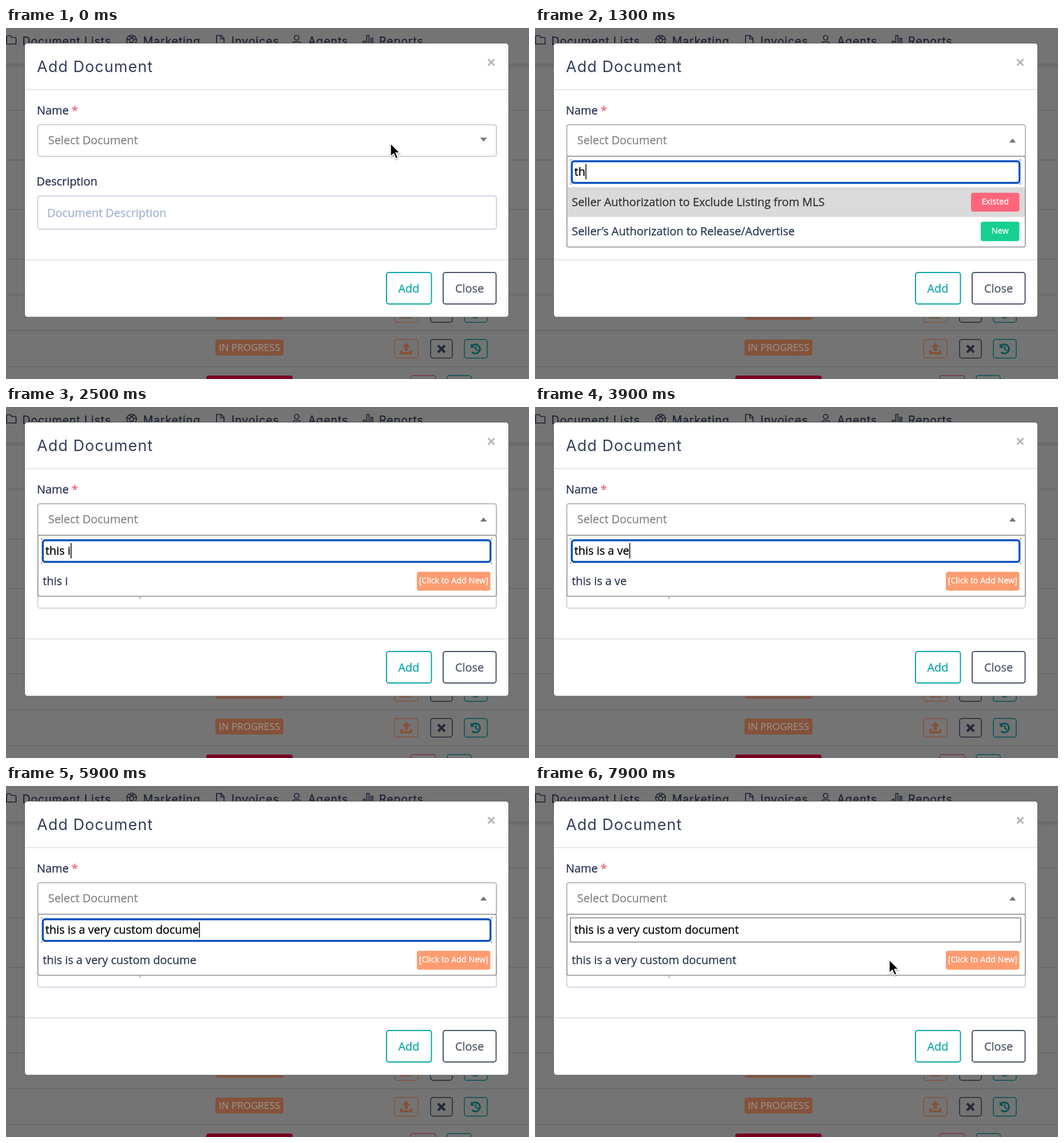
Write an HTML page that moves like this. It is 914 px wide and 613 px high and loops after 8000 ms.

```html
<!DOCTYPE html>
<html lang="en">
<head>
<meta charset="utf-8">
<title>Add Document</title>
<style>
  html, body { margin: 0; width: 100%; height: 100%; overflow: hidden; background: #747474; }
  svg { display: block; }
  text { font: 19.88px "Open Sans", "Noto Sans", sans-serif; color: #2c3654; fill: currentColor; stroke: currentColor; stroke-width: .3px; white-space: pre; }
  .nav text { font: 19.5px Inter, sans-serif; letter-spacing: .9px; color: #1d2234; }
  .nav path, .nav circle { fill: none; stroke: #1d2234; stroke-width: 1.7; }
  text.title { font: 27px Inter, sans-serif; letter-spacing: 1.05px; color: #343e59; stroke: none; }
  text.tag { font-size: 14.3px; color: #fff; text-anchor: middle; }
  text.status { font-size: 17px; color: #958d88; text-anchor: middle; }
  text.mid { text-anchor: middle; }
</style>
</head>
<body>
<svg id="stage" width="914" height="613" viewBox="0 0 914 613"></svg>
<script>
const box = (x, y, w, h, fill, stroke = 'none', sw = 1.5, r = 4) =>
  `<rect x="${x}" y="${y}" width="${w}" height="${h}" rx="${r}" fill="${fill}" stroke="${stroke}" stroke-width="${sw}"/>`;
const label = (x, y, s, cls = '', color = '') =>
  `<text x="${x}" y="${y}" class="${cls}"${color && ` style="color:${color}"`}>${s}</text>`;
const line = (d, stroke, sw = 1.5, fill = 'none') =>
  `<path d="${d}" fill="${fill}" stroke="${stroke}" stroke-width="${sw}"/>`;

const ORANGE = '#84523a', TEAL = '#045253', DARK = '#242734';

function actions(y) {
  return box(366, y, 119, 28, ORANGE) + label(425.5, y + 20, 'IN PROGRESS', 'status') +
    box(679, y, 41, 32.5, 'none', ORANGE) +
    line(`M699.5 ${y + 5.5}l7.500 8h-4.500v6.500h-6v-6.500h-4.500z`, 'none', 0, ORANGE) +
    line(`M691 ${y + 18.5}v5.500h17v-5.500`, ORANGE, 4) +
    box(742, y, 38, 32.5, 'none', DARK) +
    line(`M755 ${y + 10.5}l12 12m0-12l-12 12`, DARK, 4) +
    box(801, y, 40, 32.5, 'none', TEAL) +
    line(`M814.500 ${y + 11}a8 8 0 1 1 0 11`, TEAL, 3) +
    line(`M812 ${y + 7}v7.500h7.500z`, 'none', 0, TEAL) +
    line(`M821 ${y + 11.5}v5.500l4 2.500`, TEAL, 2.2);
}

const page = box(0, 0, 914, 613, '#747474', 'none', 0, 0) +
  '<rect y="62" width="914" height="9" fill="url(#shade)"/>' +
  [143.5, 230.5, 317, 403.500, 466, 528.5, 591.5].map(y => line(`M0 ${y}H914`, '#666', 1.4)).join('') +
  '<g class="nav">' +
  label(28.5, 30, 'Document Lists') + label(239.5, 30, 'Marketing') + label(394, 30, 'Invoices') +
  label(528, 30, 'Agents') + label(652, 30, 'Reports') +
  '<path d="M1 28V15q0-1.500 1.500-1.500h5l2.500 3h6q1.500 0 1.500 1.500v10z"/>' +
  '<circle cx="219.500" cy="21" r="8.500"/><path d="M219.500 17l4 3-1.500 5h-5l-1.500-5zM219.500 17l-4-3M219.500 17l4-3M223.500 20l5-1M215.500 20l-5-1"/>' +
  '<path d="M368 13h8l5 5v12h-13zM375.500 13v6h5.500"/>' +
  '<circle cx="508" cy="17" r="4"/><path d="M501 30v-2q0-4 4-4h6q4 0 4 4v2"/>' +
  '<path d="M624.500 29v-6h3v6M630.500 29V13h4v16M638 29V18h3v11"/></g>' +
  actions(481.5) + actions(544) +
  box(350, 607, 151, 20, '#780420') +
  box(707, 607, 44, 30, 'none', '#78343e') + box(771, 607, 42, 30, 'none', TEAL);

const modal = box(32.5, 26.5, 846, 478.5, '#fff', '#5c5c5c', 1, 5) +
  label(54, 77, 'Add Document', 'title') +
  line('M842.500 54.500l11 11m0-11l-11 11', '#b4b4b4', 3) +
  line('M34 107.500H877.500M34 405H877.500', '#dcdee2') +
  label(54, 151, 'Name <tspan style="color:#f3596b">*</tspan>', '', '#26304e') +
  box(55.5, 169, 801.5, 55, '#fff', '#c4c5c8', 1.7) +
  label(73.8, 203, 'Select Document', '', '#848484') +
  label(53.5, 275, 'Description', '', '#26304e') +
  box(55.5, 293.3, 801.5, 58, '#fff', '#c6cddb', 1.7) +
  label(72, 330, 'Document Description', '', '#a3b2d0') +
  box(665, 427, 78.5, 55, '#fff', '#0aa5a8', 2) + label(704, 462, 'Add', 'mid', '#0aa5a8') +
  box(764, 427, 92.5, 55, '#fff', '#4b5468', 2) + label(810, 462, 'Close', 'mid', '#4b5468');

const $ = id => document.getElementById(id);
$('stage').innerHTML = `<defs>
  <linearGradient id="shade" x2="0" y2="1"><stop stop-color="#676767"/><stop offset="1" stop-color="#747474"/></linearGradient>
  <clipPath id="clip"><rect id="clipBox" x="55" y="224" width="803"/></clipPath>
  <filter id="drop" x="-50%" y="-50%" width="200%" height="200%"><feDropShadow dx="0" dy="1.500" stdDeviation="1.200" flood-opacity=".4"/></filter>
  </defs>${page}${modal}
  <path id="chevron" fill="#757575"/>
  <g id="menu"><rect id="panel" x="55.8" y="224" width="801" rx="3" fill="#fff" stroke="#8d8d8d" stroke-width="1.500"/>
  <path d="M55.500 224V173q0-4 4-4H853q4 0 4 4V224" fill="none" stroke="#b4b4b4" stroke-width="1.600"/>
  <g id="rows" clip-path="url(#clip)"></g>
  ${box(61.8, 230.3, 787, 42.2, '#fff', '#858585', 1.6, 0)}
  <g id="ring">${box(61.5, 232.5, 787.5, 37.8, '#fff', '#fff', 2, 0)}${box(64.5, 229.5, 781.5, 43.5, '#fff', '#fff', 2, 0)}${box(64.3, 232.7, 782.4, 37.8, '#fff', '#0a51bd', 3.4)}</g>
  <text id="query" x="68.8" y="257.500" style="color:#000"></text>
  <path id="caret" stroke="#000" stroke-width="1.500"/></g>
  <g filter="url(#drop)"><g id="arrow"><path transform="scale(1.400)" d="M0 0V16.500L3.900 12.900 6.500 19 9.300 17.900 6.700 11.800H11.800Z" stroke="#fff" stroke-width="1.100"/></g>
  <g id="hand"><path d="M-3 16V2.500a2.500 2.500 0 0 1 5 0V9q0-2 2.300-2t2.400 2.200q.2-1.700 2.300-1.400t2.300 2.400q.4-1.200 2-.7 1.200.5 1.200 2.500V17q0 3-2 5.500V25H1.500V23Q-3 19-6.500 15.500-8.600 13-7 11.500-5 10.500-3 13Z" fill="#fff" stroke="#000" stroke-width="1.500"/><path d="M3 14.500v6M6.500 14.500v6M10 14.500v6" stroke="#000" stroke-width="1.300"/></g>
  <g id="beam"><path d="M-4-12q4 0 4 3V9q0 3-4 3M4-12q-4 0-4 3V9q0 3 4 3M-2 3h4" fill="none" stroke="#222" stroke-width="1.500"/></g></g>`;

const phrase = 'this is a very custom document';
const keyTimes = [10, 13, 16, 18, 22, 25, 27, 28, 30, 32, 37, 39, 40, 42, 44,
  45, 46, 47, 48, 49, 50, 51, 52, 53, 55, 56, 58, 59, 60, 61].map(k => k * 100);
const forms = ['Addendum for Property in a Propane Gas Service Area', 'Information About Brokerage Services',
  'Information About On Site Sewer Facility', 'Information About Survey',
  'Information from An Owners Association (HOA)', 'PVIL Email Wire Fraud Notice'];
const tags = { Existed: [84.5, '#ff667b'], New: [67.5, '#17cf92'], '[Click to Add New]': [128.5, '#fd9c71'] };

function row(name, tag, i, lit) {
  const y = i ? 278 + 52 * i - 1.5 : 278, [w, color] = tags[tag];
  return (lit ? box(56.6, 278, 799.5, 52, '#dadada', 'none', 0, 0) : '') +
    label(64.3, y + 33, name, '', lit ? '#333' : '') +
    box(846.5 - w, y + 9.7, w, i ? 34 : 33, color) + label(846.5 - w / 2, y + 30, tag, 'tag');
}

function setQuery(text) {
  const n = text.length;
  const list = n < 2 ? forms.map(f => [f, 'Existed'])
    : n == 2 ? [['Seller Authorization to Exclude Listing from MLS', 'Existed'], ['Seller’s Authorization to Release/Advertise', 'New']]
    : [[text, '[Click to Add New]']];
  const bottom = n < 2 ? 561.7 : n == 2 ? 382.5 : 330.5;
  $('rows').innerHTML = list.map(([name, tag], i) => row(name, tag, i, n < 3 && !i)).join('');
  $('panel').setAttribute('height', bottom - 224);
  $('clipBox').setAttribute('height', bottom - 224.7);
  $('query').textContent = text;
  const x = 69.8 + (n ? $('query').getComputedTextLength() : 0);
  $('caret').setAttribute('d', `M${x} 237.500v27`);
}

// Pointer stops: time, x, y
const stops = [[0, 672, 201.5], [100, 655, 198], [300, 603, 186], [500, 609, 191],
  [6900, 609, 191], [7600, 619, 303.5], [8000, 619, 303.5]];
function pointer(t) {
  const i = stops.findIndex(s => s[0] > t), [t0, x0, y0] = stops[i - 1], [t1, x1, y1] = stops[i];
  const u = (t - t0) / (t1 - t0), k = t0 == 6900 ? u * u * (3 - 2 * u) : u;
  return [x0 + (x1 - x0) * k, y0 + (y1 - y0) * k];
}

const show = (id, on) => $(id).style.display = on ? '' : 'none';
let typed = -1;

function draw(now) {
  const t = Math.floor(now % 8000 / 100) * 100;
  const open = t >= 200, count = keyTimes.filter(k => k <= t).length;
  show('menu', open);
  $('chevron').setAttribute('d', open ? 'M828.800 200h11.600l-5.800-7z' : 'M828.800 191.500h11.600l-5.800 7z');
  if (count != typed) setQuery(phrase.slice(0, typed = count));
  show('ring', t < 7800);
  show('caret', t < 700 || t >= 1000 && t < 6600);
  const [x, y] = pointer(t), visible = t < 1000 || t >= 6800;
  const kind = t < 100 || y > 273 ? 'arrow' : y > 228 ? 'beam' : 'hand';
  for (const id of ['arrow', 'hand', 'beam']) {
    show(id, visible && id == kind);
    $(id).setAttribute('transform', `translate(${x} ${y})`);
  }
}

const start = performance.now();
function tick() {
  draw(performance.now() - start);
  requestAnimationFrame(tick);
}
tick();
</script>
</body>
</html>
```
